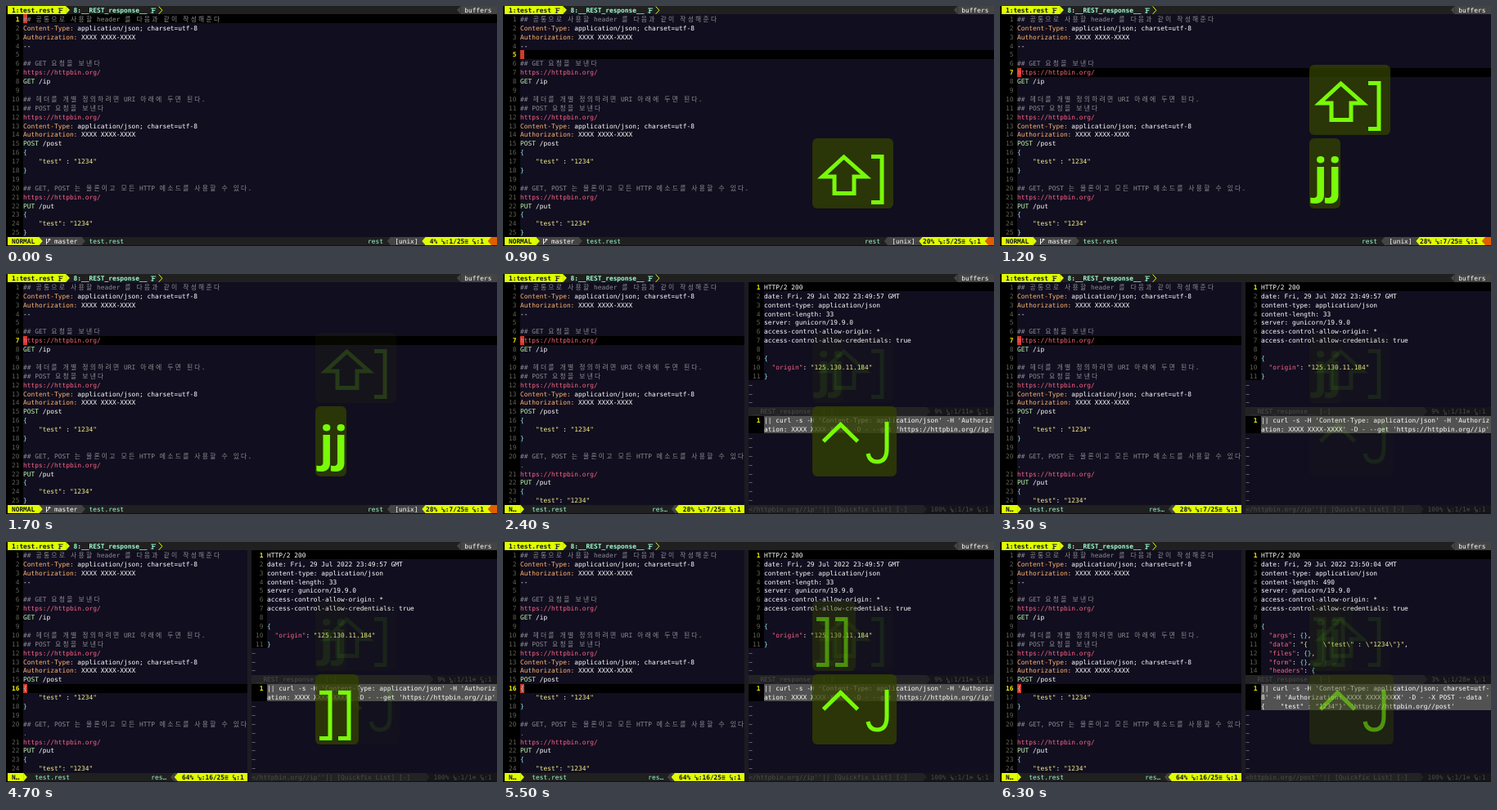
Recreate the animation shown at these times as an HTML page with a canvas. Size 600 by 294 pixels, loop 6.4 s.

```html
<!DOCTYPE html>
<html lang="ko">
<head>
<meta charset="utf-8">
<title>REST console</title>
<style>
  html, body { margin: 0; width: 100%; height: 100%; overflow: hidden; background: #110e1f; }
  canvas { display: block; }
</style>
</head>
<body>
<canvas id="stage" width="600" height="294"></canvas>
<script>
const ctx = document.getElementById('stage').getContext('2d');
const LOOP = 6400, CELL = 4.73, ROW = 294 / 27, LEFT = 2.2, TOP = -.6;
const FONT = '7.85px "DejaVu Sans Mono", "Noto Sans CJK KR", "Noto Sans CJK", monospace';
const C = {
  bg: '#110e1f', text: '#fff', comment: '#8c8c8e', key: '#ffb56e', url: '#fa6486',
  verb: '#bdf7a4', string: '#f7f08c', brace: '#8fe6e0', number: '#606058', current: '#f4f400',
  cursor: '#d23a2c', lime: '#dfff00', ink: '#101020', grey: '#444', dark: '#202020',
  mint: '#9cffd3', dim: '#4c4c4c', orange: '#df5f00', quickfix: '#525252'
};

const REQUESTS = `## 공통으로 사용할 header 를 다음과 같이 작성해준다
Content-Type: application/json; charset=utf-8
Authorization: XXXX XXXX-XXXX
--

## GET 요청을 보낸다
https://httpbin.org/
GET /ip

## 헤더를 개별 정의하려면 URI 아래에 두면 된다.
## POST 요청을 보낸다
https://httpbin.org/
Content-Type: application/json; charset=utf-8
Authorization: XXXX XXXX-XXXX
POST /post
{
    "test" : "1234"
}

## GET, POST 는 물론이고 모든 HTTP 메소드를 사용할 수 있다.
https://httpbin.org/
PUT /put
{
    "test": "1234"
}`.split('\n');

const response = (time, length, body) => [
  'HTTP/2 200', `date: Fri, 29 Jul 2022 ${time} GMT`, 'content-type: application/json',
  `content-length: ${length}`, 'server: gunicorn/19.9.0', 'access-control-allow-origin: *',
  'access-control-allow-credentials: true', '', '{', ...body];

const RESULTS = [
  {
    lines: response('23:49:57', 33, ['  "origin": "125.130.11.184"', '}']),
    command: "|| curl -s -H 'Content-Type: application/json' -H 'Authorization: XXXX XXXX-XXXX' -D - --get 'https://httpbin.org//ip'",
    percent: '9%', place: '1/11', tail: "</httpbin.org//ip''|| [Quickfix List] [-]"
  },
  {
    lines: response('23:50:04', 490, ['  "args": {},', '  "data": "{    \\"test\\" : \\"1234\\"}",',
      '  "files": {},', '  "form": {},', '  "headers": {']),
    command: "|| curl -s -H 'Content-Type: application/json; charset=utf-8' -H 'Authorization: XXXX XXXX-XXXX' -D - -X POST --data '{    \"test\" : \"1234\"}' 'https://httpbin.org//post'",
    percent: '3%', place: '1/28', tail: "<httpbin.org//post''|| [Quickfix List] [-]"
  }
];

const TOKENS = /^##.*|^https:.*|^(?:GET|POST|PUT)\b|^[A-Z][\w-]*:|"(?:\\.|[^"\\])*"|[{}]|./g;
function requestColor(token) {
  if (token.startsWith('##')) return C.comment;
  if (token.startsWith('https:')) return C.url;
  if (/^(GET|POST|PUT)$/.test(token)) return C.verb;
  if (/^[A-Z].*:$/.test(token)) return C.key;
  if (token[0] === '"' && token.length > 1) return C.string;
  return /[{}]/.test(token) ? C.brace : C.text;
}
const responseColor = token => /^"\w+"$/.test(token) ? C.url : requestColor(token);
const plainColor = () => C.text;

const x = col => LEFT + col * CELL;
const y = row => Math.max(0, TOP + row * ROW);
const cells = char => /[가-힣]/.test(char) ? 2 : 1;

function fill(row, from, to, color) {
  const left = Math.round(x(from)), right = to >= 126 ? 600 : Math.round(x(to));
  const top = Math.round(y(row));
  ctx.fillStyle = color;
  ctx.fillRect(left, top, right - left, Math.round(y(row + 1)) - top);
}

// Places characters on the terminal grid.
function write(row, col, string, color, bold) {
  ctx.font = (bold ? 'bold ' : '') + FONT;
  ctx.fillStyle = color;
  ctx.textAlign = 'center';
  for (const char of string) {
    const width = cells(char);
    if (char !== ' ') ctx.fillText(char, x(col + width / 2), row * ROW + 8);
    col += width;
  }
  return col;
}

// Draws one coloured line, wrapped at the given width; returns the rows used.
function codeLine(row, col, line, width, colorOf) {
  let used = 0, rows = 1;
  for (const token of line.match(TOKENS) || []) {
    for (const char of token) {
      if (used + cells(char) > width) { used = 0; rows++; }
      write(row + rows - 1, col + used, char, colorOf(token));
      used += cells(char);
    }
  }
  return rows;
}

function lineNumber(row, col, n, active) {
  fill(row, col, col + 4, '#000');
  write(row, col + 3 - String(n).length, String(n), active ? C.current : C.number, active);
}

function path(d, color, width) {
  ctx.strokeStyle = color;
  ctx.lineWidth = width;
  ctx.stroke(new Path2D(d));
}

function arrow(row, col, color, back) {
  const tip = back ? x(col) : x(col + 1), base = back ? x(col + 1) : x(col);
  ctx.fillStyle = color;
  ctx.fill(new Path2D(`M${base} ${y(row)}L${tip} ${y(row + .5)}L${base} ${y(row + 1)}Z`));
}

function fileIcon(col, color) {
  const l = x(col);
  path(`M${l} 3h6M${l + 1} 5.5h4M${l} 8h3M${l + 2} 3v6`, color, .9);
}

function stackedIcon(row, col, top, color) {
  ctx.font = 'bold 5px "DejaVu Sans Mono", monospace';
  ctx.fillStyle = color;
  ctx.fillText(top, x(col) + 1.5, row * ROW + 5.4);
  ctx.fillText('N', x(col) + 3.2, row * ROW + 9.2);
}

const positionStart = (end, percent, place) => end - percent.length - place.length - 9;

// Right-aligned scroll position info.
function position(row, end, percent, place, color, bold) {
  let col = write(row, positionStart(end, percent, place), percent + ' ', color, bold);
  stackedIcon(row, col, 'L', color);
  col = write(row, col + 1, `:${place}≡ `, color, bold);
  stackedIcon(row, col, 'C', color);
  write(row, col + 1, ':1', color, bold);
}

function tabline() {
  fill(0, 0, 126, C.dark);
  fill(0, 0, 15, C.lime);
  arrow(0, 15, C.lime);
  write(0, 1, '1:test.rest', C.ink, true);
  fileIcon(13, C.ink);
  write(0, 17, '8:__REST_response__', C.mint, true);
  fileIcon(37, C.mint);
  path(`M${x(39)} .5l4.2 4.7l-4.2 4.7`, C.lime, 1);
  arrow(0, 116, C.grey, true);
  fill(0, 117, 126, C.grey);
  write(0, 118, 'buffers', '#fff');
}

function statusline(line, split) {
  const row = 26, place = `${line}/25`, percent = `${line * 4}%`.padStart(3);
  const end = split ? 62 : 124;
  const start = positionStart(end, percent, place);
  fill(row, 0, end, C.dark);
  if (split) {
    fill(row, 0, 4, C.lime);
    arrow(row, 4, C.lime);
    write(row, 1, 'N…', C.ink, true);
    write(row, 7, 'test.rest', C.mint);
    write(row, start - 8, 'res…', C.mint);
    arrow(row, start - 3, C.grey, true);
    fill(row, start - 2, end, C.grey);
    arrow(row, start - 2, C.lime, true);
  } else {
    fill(row, 8, 19, C.grey);
    fill(row, 0, 8, C.lime);
    arrow(row, 8, C.lime);
    arrow(row, 19, C.grey);
    write(row, 1, 'NORMAL', C.ink, true);
    path(`M${x(10)} 285v7M${x(10)} 290q3.5-1 3.5-4m-1.5 1l1.5-2l1.5 2`, '#fff', .9);
    write(row, 12, 'master', '#fff');
    write(row, 21, 'test.rest', C.mint);
    write(row, start - 15, 'rest', C.mint);
    arrow(row, start - 10, C.grey, true);
    fill(row, start - 9, start, C.grey);
    write(row, start - 8, '[unix]', '#fff');
    arrow(row, start - 1, C.lime, true);
  }
  fill(row, split ? start - 1 : start, end, C.lime);
  position(row, end, percent, place, C.ink, true);
  if (!split) {
    fill(row, 124, 126, C.lime);
    arrow(row, 124, C.orange, true);
    fill(row, 125, 126, C.orange);
  }
}

function inactiveStatus(row, col, title, percent, place) {
  const edge = positionStart(126, percent, place) - 2;
  fill(row, 63, 126, '#15151a');
  fill(row, 63, edge, '#232325');
  arrow(row, edge, '#232325');
  write(row, col, title, C.dim);
  position(row, 126, percent, place, C.dim);
}

function requestPane(line, split) {
  const width = split ? 58 : 122;
  ctx.fillStyle = '#000';
  ctx.fillRect(0, 0, Math.round(x(4)), 294);
  let row = 1;
  REQUESTS.forEach((text, i) => {
    if (row > 25) return;
    const active = i + 1 === line;
    if (active) {
      fill(row, 4, split ? 62 : 126, '#000');
      fill(row, 4, 5, C.cursor);
    }
    lineNumber(row, 0, i + 1, active);
    row += codeLine(row, 4, text, width, requestColor);
  });
  statusline(line, split);
}

function resultPanes({ lines, command, percent, place, tail }) {
  for (let row = 1; row < 27; row++) fill(row, 62, 63, '#1c1b22');
  fill(1, 63, 126, '#000');
  for (let row = 1; row < 15; row++) {
    if (row <= lines.length) {
      lineNumber(row, 63, row, row === 1);
      codeLine(row, 67, lines[row - 1], 59, responseColor);
    } else write(row, 63, '~', C.comment);
  }
  inactiveStatus(15, 64, '__REST_response__ [-]', percent, place);
  const rows = Math.ceil(command.length / 59);
  for (let i = 0; i < rows; i++) {
    fill(16 + i, 63, 67, '#000');
    fill(16 + i, 67, 126, C.quickfix);
  }
  lineNumber(16, 63, 1, true);
  codeLine(16, 67, command, 59, plainColor);
  for (let row = 16 + rows; row < 26; row++) write(row, 63, '~', C.comment);
  inactiveStatus(26, 63, tail, '100%', '1/1');
}

// Key bezels: glyph paths are relative to the box corner.
const bracket = left => `M${left} 22.5h13v56h-13`;
const CTRL_J = { width: 103, path: 'M13.5 43l21-20.5l21 20.5M91 19v33q0 16-12 16q-9 0-11-10' };
const KEYS = [
  { start: 500, last: 500, raised: 950, width: 99,
    path: 'M38.5 23L12.5 47h14.5v20.5h24v-20.5h14.5Z' + bracket(72) },
  { start: 950, last: 1100, raised: 2100, width: 38, text: 'jj' },
  { start: 2100, last: 2100, raised: LOOP, ...CTRL_J },
  { start: 4200, last: 4400, raised: 5200, width: 53, path: bracket(5), second: bracket(28) },
  { start: 5200, last: 5200, raised: LOOP, ...CTRL_J }
];
const HOLD = 950, FADE = 300, RESIDUE = .08;

function bezel(key, t) {
  if (t < key.start) return;
  const single = t < key.last;
  const width = single ? (key.text ? 26 : 30) : key.width;
  const color = '#78fa08';
  ctx.save();
  ctx.globalAlpha = Math.max(RESIDUE, Math.min(1, 1 - (t - key.last - HOLD) / FADE));
  ctx.translate(378, t < key.raised ? 162 : 72);
  ctx.fillStyle = 'rgba(51, 66, 0, .75)';
  ctx.beginPath();
  ctx.roundRect(0, 0, width, 86, 6);
  ctx.fill();
  if (key.text) {
    ctx.font = '600 57px "Noto Sans", sans-serif';
    ctx.textAlign = 'left';
    ctx.fillStyle = color;
    ctx.fillText(single ? 'j' : key.text, 5, 66);
  } else {
    path(key.path + (key.second && !single ? key.second : ''), color, 5);
  }
  ctx.restore();
}

function draw(t) {
  const line = t < 500 ? 1 : t < 950 ? 5 : t < 1100 ? 6 : t < 4400 ? 7 : 16;
  const split = t >= 2300;
  ctx.fillStyle = C.bg;
  ctx.fillRect(0, 0, 600, 294);
  requestPane(line, split);
  tabline();
  if (split) resultPanes(RESULTS[t < 5800 ? 0 : 1]);
  for (const key of KEYS) bezel(key, t);
}

const begin = performance.now();
function tick() {
  draw((performance.now() - begin) % LOOP);
  requestAnimationFrame(tick);
}
tick();
</script>
</body>
</html>
```
